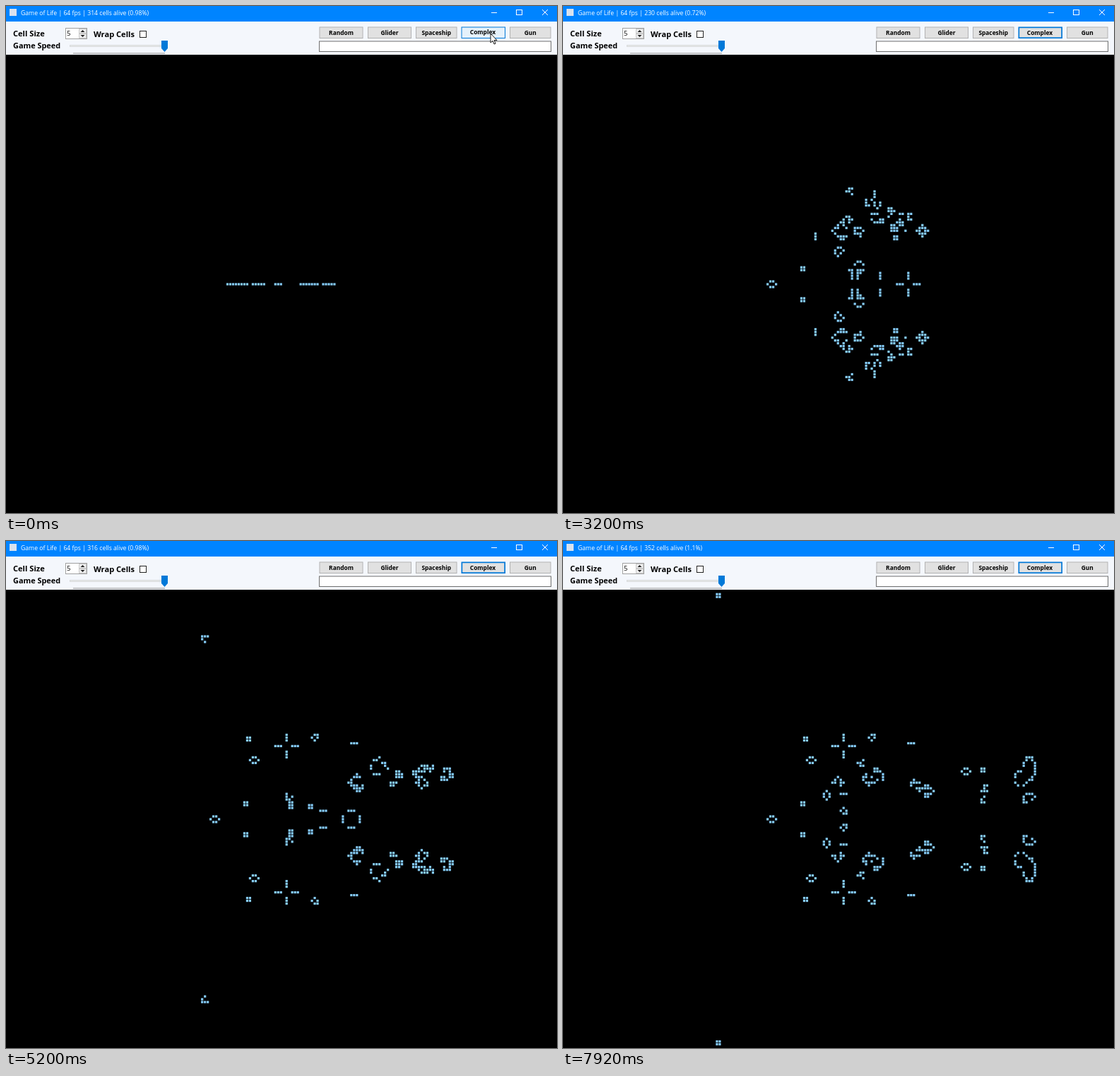
These frames come from a looping animation (780x718 px, 8000 ms). An HTML page with a canvas:

```html
<!DOCTYPE html>
<html lang="en">
<head>
<meta charset="utf-8">
<title>Game of Life</title>
<style>
  html, body { margin: 0; width: 100%; height: 100%; overflow: hidden; background: #000; }
  canvas { display: block; }
</style>
</head>
<body>
<canvas id="stage" width="780" height="718"></canvas>
<script>
const ctx = document.getElementById('stage').getContext('2d');
const LOOP = 8000, TICK = 80, PER_TICK = 5;
const SANS = '"Open Sans", "Noto Sans", sans-serif';
const BLUE = '#0078d7';

// --- Simulation: the outermost rows are walls and stay dead ---
const W = 200, H = 163, MID = 81, COL0 = 79, TOTAL = 32111;
const NEAR = [-W - 1, -W, -W + 1, -1, 1, W - 1, W, W + 1];

function seed() {
  const cells = [];
  let c = 0;
  for (const [run, gap] of [[8, 1], [5, 3], [3, 6], [7, 1], [5, 0]]) {
    for (let i = 0; i < run; i++) cells.push(MID * W + COL0 + c++);
    c += gap;
  }
  return cells;
}

function step(cells) {
  const count = new Uint8Array(W * H), alive = new Uint8Array(W * H);
  for (const i of cells) {
    alive[i] = 1;
    for (const d of NEAR) count[i + d]++;
  }
  const next = [];
  for (let i = W; i < W * (H - 1); i++) {
    if (count[i] === 3 || (count[i] === 2 && alive[i])) next.push(i);
  }
  return next;
}

const gens = [seed()];
while (gens.length < 530) gens.push(step(gens[gens.length - 1]));

// Phase: at 3920 ms the topmost glider sits flat side up with its head in row 36.
const HEAD = [36, 36, 36, 37, 38];
const found = gens.findIndex(g => HEAD.every((row, i) => Math.floor(g[i] / W) === row));
const lead = (found < 0 ? 243 : found) - 3920 / TICK * PER_TICK;

function cellsAt(t) {
  const tick = Math.floor(t / TICK);
  const g = tick ? Math.max(1, tick * PER_TICK + lead) : 0;
  return gens[Math.min(g, gens.length - 1)];
}

// --- Title readings: start time, fps, cells alive (counted when absent) ---
const READINGS = [
  [0, 64, 314], [720, 67, 198], [1744, 64, 158], [2768, 64], [3792, 64, 266],
  [4816, 64, 316], [5840, 64, 364], [6864, 64], [7888, 64, 352]
];

function titleAt(t) {
  const [start, fps, known] = READINGS.filter(r => r[0] <= t).pop();
  const n = known ?? cellsAt(start).length;
  return `Game of Life | ${fps} fps | ${n} cells alive (${+(100 * n / TOTAL).toFixed(2)}%)`;
}

// --- Drawing helpers ---
function rect(x, y, w, h, fill) {
  ctx.fillStyle = fill;
  ctx.fillRect(x, y, w, h);
}

function box(x, y, w, h, fill, edge, line = 1) {
  rect(x, y, w, h, edge);
  rect(x + line, y + line, w - 2 * line, h - 2 * line, fill);
}

function text(str, x, y, size, { weight = 400, fill = '#000', align = 'left' } = {}) {
  ctx.font = `${weight} ${size}px ${SANS}`;
  ctx.textAlign = align;
  ctx.fillStyle = fill;
  ctx.fillText(str, x, y);
}

function poly(points, fill, stroke) {
  ctx.beginPath();
  points.forEach(([x, y]) => ctx.lineTo(x, y));
  ctx.closePath();
  ctx.fillStyle = fill;
  ctx.fill();
  if (stroke) {
    ctx.strokeStyle = stroke;
    ctx.lineWidth = 0.9;
    ctx.stroke();
  }
}

function titleBar(t) {
  rect(0, 0, 780, 22, '#0084ff');
  rect(5, 4, 10, 10, '#d8e2ee');
  text(titleAt(t), 21, 13, 8.66, { fill: '#fff' });
  rect(687, 9, 8, 1, '#fff');
  ctx.strokeStyle = '#fff';
  ctx.lineWidth = 1;
  ctx.strokeRect(722.5, 5.5, 8, 7);
  ctx.beginPath();
  ctx.moveTo(759, 5);
  ctx.lineTo(767, 13);
  ctx.moveTo(767, 5);
  ctx.lineTo(759, 13);
  ctx.stroke();
}

function settings() {
  const bold = { weight: 700 };
  text('Cell Size', 10, 43, 11.1, bold);
  text('Game Speed', 10, 60, 10.9, bold);
  text('Wrap Cells', 124, 44, 11.1, bold);

  box(84, 31, 31, 16, '#fff', '#a0a0a0');
  text('5', 86, 42, 9.6);
  box(103, 32, 11, 7, '#f0f0f0', '#c8c8c8');
  box(103, 39, 11, 7, '#f0f0f0', '#c8c8c8');
  poly([[105.5, 37], [108.5, 34], [111.5, 37]], '#222');
  poly([[105.5, 41], [111.5, 41], [108.5, 44]], '#222');
  box(189, 35, 10, 10, '#fff', '#222');

  box(90, 55, 138, 3, '#e7eaea', '#d9dbdc');
  rect(95, 66, 130, 2, '#c2c3c5');
  poly([[220, 49], [229, 49], [229, 60], [224.5, 65], [220, 60]], '#0079d8');
}

const BUTTONS = [
  ['Random', 443.5, 62], ['Glider', 512, 62], ['Spaceship', 580, 58.5],
  ['Complex', 644.5, 62.5], ['Gun', 713, 58.5]
];

function buttons(hover) {
  for (const [name, x, w] of BUTTONS) {
    const active = name === 'Complex', lit = active && hover;
    if (lit) box(x, 29.5, w, 16.5, '#e5f1fb', BLUE);
    else box(x, 29.5, w, 16.5, '#e1e1e1', active ? BLUE : '#adadad', active ? 1.7 : 0.9);
    text(name, x + w / 2 - (active ? 0.8 : 0), lit ? 40.4 : 41, 8.4, { weight: 700, align: 'center' });
  }
  box(443, 49.5, 329, 15.5, '#fff', '#6e6e6e');
}

function cursor(x, y) {
  const arrow = [[0, 0], [0, 13], [3, 10.3], [5, 15], [7, 14.2], [5, 9.6], [9, 9.6]];
  poly(arrow.map(([dx, dy]) => [x + dx, y + dy]), '#fff', '#000');
}

function board(t) {
  const pitch = 3.984, size = 3.2;
  rect(0, 69, 780, 649, '#000');
  ctx.fillStyle = '#87cefa';
  for (const i of cellsAt(t)) {
    const c = i % W - COL0, r = Math.floor(i / W) - MID;
    ctx.fillRect(311.95 + c * pitch, 392.4 + r * pitch, size, size);
  }
}

function draw(now) {
  const t = now % LOOP;
  const hover = t < 400;
  rect(0, 22, 780, 47, '#f4f7fc');
  titleBar(t);
  settings();
  buttons(hover);
  board(t);
  if (hover) cursor(686, 39);
  requestAnimationFrame(draw);
}
requestAnimationFrame(draw);
</script>
</body>
</html>
```
